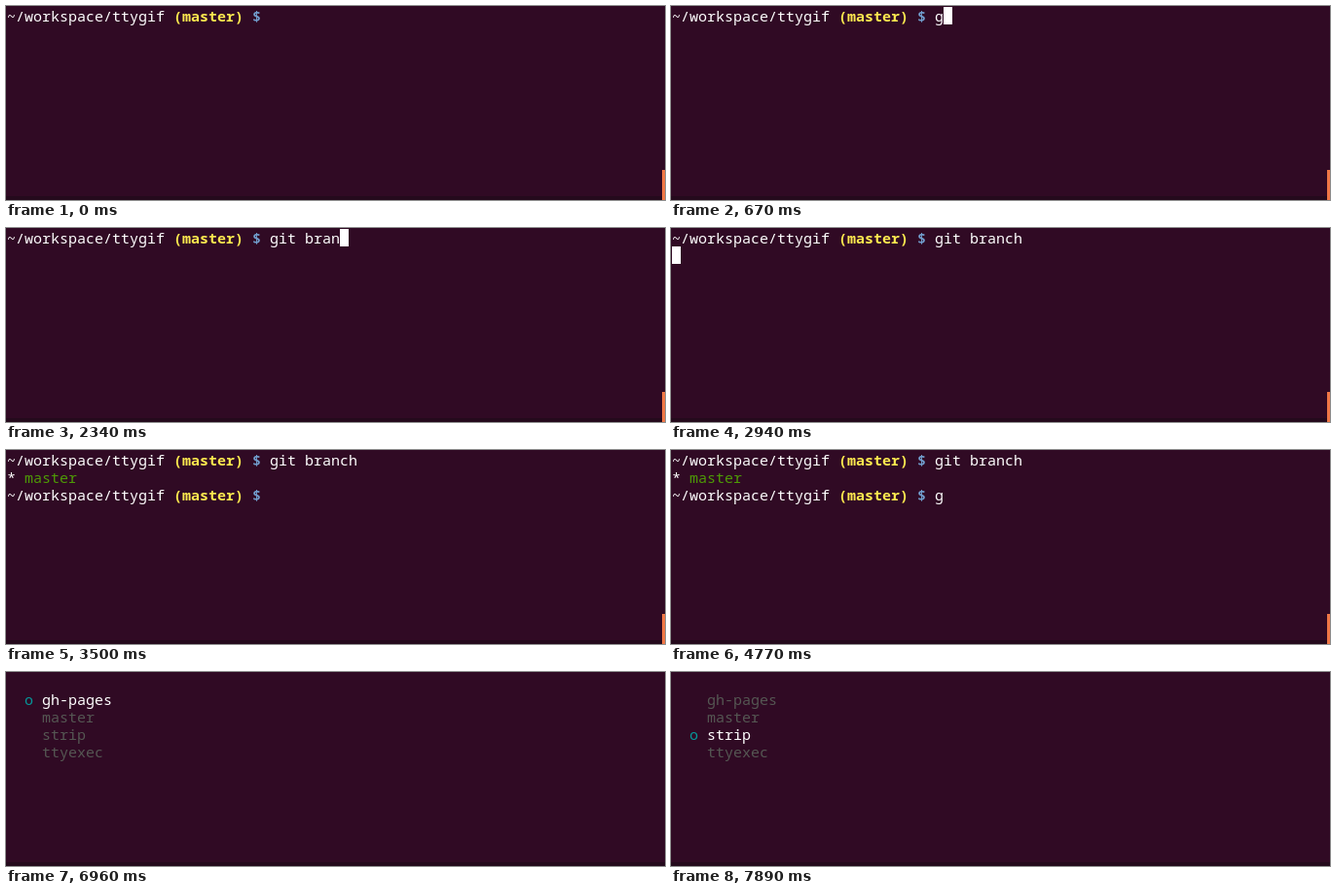
Animation, 677 px wide and 200 px high, one loop 8 s. Source, as an HTML page:

```html
<!DOCTYPE html>
<html lang="en">
<head>
<meta charset="utf-8">
<title>Terminal session</title>
<style>
  html, body { margin: 0; width: 100%; height: 100%; overflow: hidden; background: #300a24; }
  svg { display: block; }
  text { font: 15px "Noto Sans Mono", "DejaVu Sans Mono", monospace; white-space: pre; }
  .bold { font-weight: 700; }
</style>
</head>
<body>
<svg width="677" height="200" viewBox="0 0 677 200">
  <rect width="677" height="200" fill="#300a24"/>
  <rect y="196" width="677" height="4" fill="#240a1c"/>
  <rect id="scrollbar" x="674" y="169" width="3" height="31" fill="#f07746"/>
  <g id="screen"></g>
</svg>
<script>
const LOOP = 8000, CELL_W = 9, CELL_H = 18, PROMPT_COLS = 30;
const WHITE = '#ffffff', YELLOW = '#fce94f', BLUE = '#729fcf',
      GREEN = '#4e9a06', GREY = '#555753', CYAN = '#06989a';
const BRANCHES = ['gh-pages', 'master', 'strip', 'ttyexec'];

const screen = document.getElementById('screen');
const scrollbar = document.getElementById('scrollbar');

function add(tag, attrs, content = '') {
  const node = document.createElementNS('http://www.w3.org/2000/svg', tag);
  for (const key in attrs) node.setAttribute(key, attrs[key]);
  node.textContent = content;
  screen.append(node);
}

function put(row, col, content, fill = WHITE, weight = '') {
  add('text', { x: 1 + col * CELL_W, y: 16 + row * CELL_H, fill, class: weight }, content);
}

function cursor(row, col) {
  add('rect', { x: 1 + col * CELL_W, y: 1 + row * CELL_H, width: CELL_W, height: CELL_H, fill: WHITE });
}

function prompt(row, typed, showCursor) {
  put(row, 0, '~/workspace/ttygif');
  put(row, 19, '(master)', YELLOW, 'bold');
  put(row, 28, '$', BLUE, 'bold');
  put(row, PROMPT_COLS, typed);
  if (showCursor) cursor(row, PROMPT_COLS + typed.length);
}

const first = (typed, on = true) => () => prompt(0, typed, on);

const entered = () => {
  prompt(0, 'git branch', false);
  cursor(1, 0);
};

const second = (typed, on = true) => () => {
  prompt(0, 'git branch', false);
  put(1, 0, '*');
  put(1, 2, 'master', GREEN);
  prompt(2, typed, on);
};

const menu = selected => () => BRANCHES.forEach((name, i) => {
  if (i === selected) put(i + 1, 2, 'o', CYAN);
  put(i + 1, 4, name, i === selected ? WHITE : GREY);
});

const CLEAR_AT = 5950;
const steps = [
  [0, first('', false)],
  [490, first('')],
  [590, first('g')],
  [690, first('gi')],
  [780, first('git')],
  [870, first('git ')],
  [1440, first('git ', false)],
  [1680, first('git b')],
  [1970, first('git br')],
  [2190, first('git bra')],
  [2340, first('git bran')],
  [2470, first('git branc')],
  [2550, first('git branch')],
  [2940, entered],
  [2980, second('')],
  [3500, second('', false)],
  [4100, second('')],
  [4180, second('g')],
  [4770, second('g', false)],
  [4820, second('g ')],
  [5260, second('g b')],
  [5400, second('g br')],
  [CLEAR_AT, () => {}],
  [6960, menu(0)],
  [7610, menu(1)],
  [7890, menu(2)]
];

let shown = null;
function render() {
  const t = performance.now() % LOOP;
  const step = steps.findLast(([start]) => start <= t);
  if (step !== shown) {
    shown = step;
    screen.replaceChildren();
    step[1]();
    scrollbar.style.display = step[0] < CLEAR_AT ? '' : 'none';
  }
  requestAnimationFrame(render);
}
render();
</script>
</body>
</html>
```
